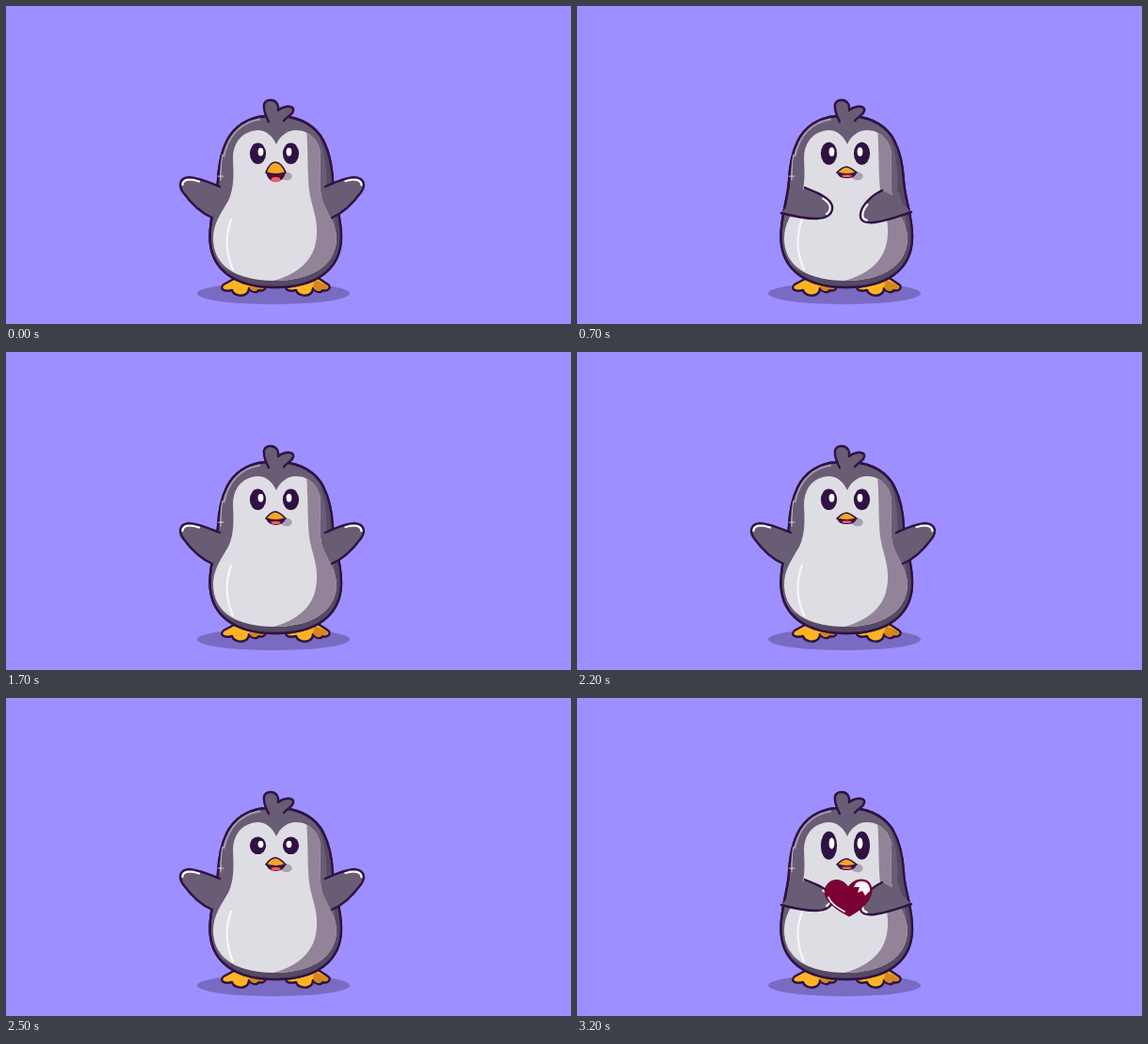
Recreate the animation shown at these times as an HTML page. Size 600 by 338 pixels, loop 3300 ms.

```html
<!DOCTYPE html>
<html lang="en">
<head>
<meta charset="utf-8">
<title>Penguin</title>
<style>
  html, body { margin: 0; width: 100%; height: 100%; overflow: hidden; background: #9d8fff; }
  svg { display: block; width: 100%; height: 100%; }
  .line { stroke: #2f1242; stroke-width: 2.4; stroke-linejoin: round; stroke-linecap: round; }
  .thin { stroke-width: 1.7; }
  .open { fill: none; }
  .grey { fill: #695c75; }
  .shine { fill: none; stroke: #f9f6fc; stroke-linecap: round; }
</style>
</head>
<body>
<svg viewBox="0 0 600 338">
  <defs>
    <path id="body" d="M284 116.5C262 116.5 246 125 237 139C229 152 226 167 225 186C224 205 216.5 222 216.5 245C216.5 281 244 299 286 299C328 299 356 281 356 245C356 222 348 205 347 186C346 167 343 152 334 138C324 124 306 116.5 284 116.5Z"/>
    <path id="belly" d="M287 147C283 138 276 132 267 132C251 133 241 145 241 162C242 181 242 194 236 207C228 221 220 231 220 247C220 277 246 292 285 292C324 292 351 276 351 246C350 229 338 217 335 203C332 188 334 173 334 158C333 143 322 132 308 132C299 132 291 138 287 147Z"/>
    <clipPath id="bodyClip"><use href="#body"/></clipPath>
    <clipPath id="bellyClip"><use href="#belly"/></clipPath>
    <g id="foot">
      <path class="line" fill="#fdb423" d="M244 289L231 296C226 301 232 304 240 302C242 308 251 309 255 306C258 304 258 302 258 300C261 305 267 305 268 302C274 304 278 299 274 296L262 288Z"/>
      <path fill="#d4861f" d="M258 299C261 304 266 304 267 301C273 302 276 299 273 297L260 291Z"/>
    </g>
  </defs>

  <rect width="600" height="338" fill="#9d8fff"/>
  <ellipse cx="284" cy="305.5" rx="81" ry="11.5" fill="#796bc1"/>
  <use href="#foot"/>
  <use href="#foot" x="68"/>

  <use href="#body" class="line grey"/>
  <g clip-path="url(#bodyClip)">
    <path d="M320 112C338 140 342 175 340 195C356 230 360 290 286 290C250 290 230 282 220 268V305H365V112Z" fill="#564964"/>
    <path d="M270 120C248 123 235 138 231 160" fill="none" stroke="#a398ae" stroke-width="3"/>
  </g>
  <use href="#body" class="line open"/>
  <path class="line grey" d="M279 123C277 119 274 113 274 108C273 102 277 99.5 282 100C288 101 290 106 289 111C293 107 302 105 305 109C307 114 299 117 295 122"/>
  <path class="grey" d="M280 114H294V124H280Z"/>

  <use href="#belly" fill="#dfdde4"/>
  <path clip-path="url(#bellyClip)" fill="#928399" d="M319 130C321 155 320 180 322 196C324 212 331 224 330 242C329 268 313 285 280 293H355V130Z"/>
  <path class="shine" stroke-width="2.2" d="M239 227C232 246 234 264 241 280"/>
  <path class="shine" stroke-width="1" opacity=".75" d="M230 158C228 167 228 174 228 185M225 181H231"/>

  <g id="eyes"></g>

  <path d="M293 177C304 174 307 183 300 185C295 186 291 183 290 180Z" fill="#aaa0b2"/>
  <path id="mouth" class="line thin" fill="#550b31"/>
  <ellipse id="tongue" cx="286.5" rx="5" fill="#ee5967"/>
  <path id="beak" class="line thin" fill="#f8a426"/>

  <g id="wings"></g>

  <g id="heart">
    <path fill="#7d0234" stroke="#5c0630" d="M288 201C283 193 273 191 267 197C259 205 265 216 273 222C279 227 284 229 289 232C297 228 306 221 310 214C315 206 313 196 307 194C300 191 292 195 288 201Z"/>
    <path class="shine" stroke-width="1.8" d="M267 212C270 219 277 223 284 227"/>
    <path fill="#fbf4f8" d="M296 197C303 192 312 196 311 205L306 210L303 205L298 207L300 201L294 201Z"/>
  </g>
</svg>
<script>
const LOOP = 3300, STEP = 100;
const $ = id => document.getElementById(id);

// Each wing edge runs from the shoulder round the tip to the armpit.
const wings = [
  { spread: "M227 192C215 187 203 182 194 182C184 183 183 191 188 198C196 209 207 220 219 225",
    folded: "M242 193C254 198 270 204 271 213C272 222 264 226 254 226C240 226 228 223 217 220",
    pit: "L231 204Z" },
  { spread: "M339 192C350 187 361 182 370 182C381 183 382 191 377 198C369 209 358 220 346 225",
    folded: "M324 196C313 201 302 212 301 221C300 230 308 231 316 230C330 228 343 223 355 219",
    pit: "L340 204Z" }
];

const clamp = x => Math.min(1, Math.max(0, x));
const ramp = (t, from, to) => clamp((t - from) / (to - from));
const pulse = (t, mid, half) => clamp(2 - Math.abs(t - mid) / half);

function mixPaths(from, to, k) {
  const ends = to.match(/[\d.]+/g);
  let i = 0;
  return from.replace(/[\d.]+/g, n => +n + (ends[i++] - n) * k);
}

function eye(cx, glintX, ry) {
  const cy = 156.8;
  return `<ellipse cx="${cx}" cy="${cy}" rx="8.6" ry="${ry}" fill="#2f1242"/>` +
    `<ellipse cx="${glintX}" cy="${cy - ry * .15}" rx="2.9" ry="${ry * .4}" fill="#fff"/>`;
}

function drawMouth(open) {
  const top = 171 - 5 * open, bottom = 183 + 5 * open;
  $("mouth").setAttribute("d", `M277 177C279 ${bottom + 1} 294 ${bottom + 1} 296 177Z`);
  $("tongue").setAttribute("cy", bottom - 2.5 - open);
  $("tongue").setAttribute("ry", 1.5 + 1.2 * open);
  $("beak").setAttribute("d", `M276 177C279 ${top + 3} 283 ${top} 286 ${top}C290 ${top} 294 ${top + 4} 297 177C291 179 282 179 276 177Z`);
}

function drawWings(fold) {
  $("wings").innerHTML = wings.map(({ spread, folded, pit }, side) => {
    const edge = mixPaths(spread, folded, fold);
    return `<clipPath id="wing${side}"><path d="${edge + pit}"/></clipPath>
      <path class="grey" d="${edge + pit}"/>
      <path class="shine" d="${edge}" clip-path="url(#wing${side})" pathLength="100"
        stroke-width="7" stroke-dasharray="0 22 28 100" style="stroke-linecap:butt"/>
      <path class="line open" d="${edge}"/>`;
  }).join("");
}

function render(t) {
  const clap = pulse(t, 750, 50) + pulse(t, 2350, 50);
  const fold = clap + ramp(t, 2700, 2900);
  const love = ramp(t, 2900, 3100);
  const squint = pulse(t, 2600, 100);
  const chatter = Math.cos(Math.PI * t / 400) ** 4;

  const eyeHeight = 11.2 + .8 * fold + 3 * love - 1.9 * squint;
  $("eyes").innerHTML = eye(267.5, 270.5, eyeHeight) + eye(302.5, 300.5, eyeHeight);
  drawMouth(chatter * (1 - fold));
  drawWings(fold);
  $("heart").setAttribute("transform", `translate(288 213) scale(${love}) translate(-288 -213)`);
  $("heart").setAttribute("visibility", love ? "visible" : "hidden");
}

const start = performance.now();
function tick() {
  const t = (performance.now() - start) % LOOP;
  render(Math.floor(t / STEP) * STEP);
  requestAnimationFrame(tick);
}
tick();
</script>
</body>
</html>
```
